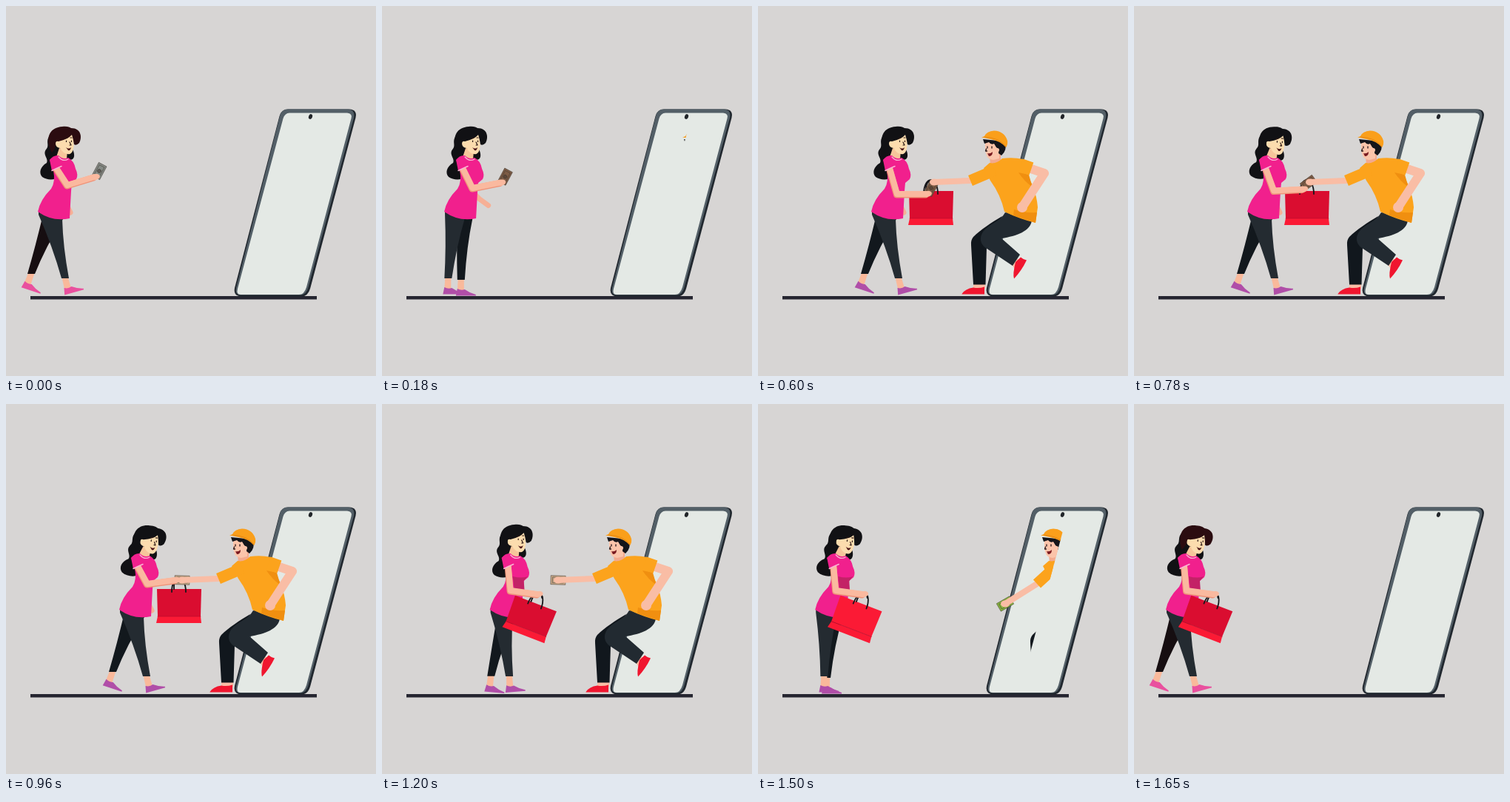
Recreate the animation shown at these times as an HTML page. Size 500 px wide and 500 px high, loop 1.83 s.

```html
<!DOCTYPE html>
<html lang="en">
<head>
<meta charset="utf-8">
<title>Doorstep delivery</title>
<style>
  html, body { margin: 0; width: 100%; height: 100%; overflow: hidden; background: #d7d5d4; }
  svg { display: block; width: 100%; height: 100%; }
  .line { fill: none; stroke-linecap: round; stroke-linejoin: round; }
</style>
</head>
<body>
<svg viewBox="0 0 500 500">
  <defs>
    <!-- The courier steps out of a slanted slit in the middle of the screen. -->
    <clipPath id="slit"><path d="M0,0H458L324,500H0Z"/></clipPath>
    <g id="foot">
      <path d="M-4,-2H4V15H-5Z" fill="#f9b99b"/>
      <path d="M-5,12Q0,15 5,13Q12,18 20,20V21.500H-7Z" fill="currentColor"/>
    </g>
  </defs>

  <path d="M33,392H420V396.500H33Z" fill="#252530"/>

  <g id="phone">
    <path d="M381,139.500H464Q475,140 472.500,151L411,382Q408,392 400,392.500H318Q307,392 309,381L369.500,149Q372,139.500 381,139.500Z" fill="#20272e"/>
    <path d="M381,139.500H462Q472,140 470,151L408.500,380Q406,390 398,390.500H318Q309,391 311,381L370,149Q372,139.500 381,139.500Z" fill="#535f67"/>
    <path d="M383,144.500H461Q468.500,145 466.500,152L406,380Q403,390 396,390H317Q311,390 313,382L374.500,152Q377,144.500 383,144.500Z" fill="#e4e9e5"/>
    <ellipse cx="411.500" cy="149.500" rx="2.500" ry="3.500" transform="rotate(18 411.500 149.500)" fill="#22262a"/>
  </g>

  <g clip-path="url(#slit)"><g class="man">
    <path d="M291,375H307V382H291Z" fill="#f9bda5"/>
    <path d="M275.500,389Q280,382 291,380.500Q299,382 306,379.500V389.500H275.500Z" fill="#f0162f"/>
    <path d="M330,284C316,292 300,303 291,312Q287.500,316 288,323L291,376.500H307.500L309,326Z" fill="#11171d"/>
    <path d="M343,350L350,341L355,345L347,355Z" fill="#f9bda5"/>
    <path d="M348,346L355,339.500Q359,343 363,343.500Q356,358 346,368.500Q344,362 348,346Z" fill="#f0162f"/>
    <path d="M334,279L370,290C368,304 350,311 329,314L354,336L344,351L308,327C298,320 299,308 309,300C317,293 328,290 334,279Z" fill="#222a31"/>
    <path d="M313,203L328,198V209L324,217L314,215Z" fill="#f3aa8e"/>
    <path d="M313,212Q322,214 330,206Q345,204 358,207L367,212L365,231L371,242Q377,258 378,272L375,293Q354,288 333,278Q328,255 314,236L305,219Z" fill="#fca31c"/>
    <path d="M352,225Q359,236 371,245L366,228ZM346,275Q360,280 377,279L375,293L345,283Z" fill="#f08f10"/>
    <path id="manBackArm" class="line" stroke="#f9bda5" stroke-width="12"/>
    <circle id="manBackHand" r="7" fill="#f9bda5"/>
    <path id="manBackSleeve" stroke="#fca31c" stroke-width="18"/>
    <path d="M307,185L318,183L322,190L326,191V206L318,208Q310,207 309,202L307,196Z" fill="#fbc4aa"/>
    <path d="M304,180L334,183Q337,195 329,202L325,199Q326,193 322,191L319,186Q315,188 312,184L306,186Z" fill="#15151a"/>
    <circle cx="323.500" cy="194.500" r="2.500" fill="#fbc4aa"/>
    <path d="M310,199Q314,200 317,197Q317,203 312,203Z" fill="#7a1a20"/>
    <path d="M310,190v2M316,190v2M308.500,193l-1,3h2" class="line" stroke="#241519" stroke-width="1.300"/>
    <path d="M302,177.500L306,176Q309,169 319,168.500Q333,169 337,182Q338,187 335,191Q327,182 314,180Q307,178 302,177.500Z" fill="#fa9f1b"/>
    <path d="M306,177Q326,178 335,190" class="line" stroke="#e58512" stroke-width="1"/>
  </g></g>

  <g class="woman">
    <path id="backArm" class="line" stroke="#f6b096" stroke-width="7"/>
    <use id="farFoot" href="#foot"/>
    <path id="farLeg"/>
    <use id="nearFoot" href="#foot"/>
    <path id="nearLeg" fill="#242b31"/>
    <g id="head">
      <path d="M60,174C52,183 60,188 54,194C49,201 58,206 55,212C46,217 44,226 49,231C56,236 67,235 72,231C77,225 77,219 74,211L82,206C91,211 94,204 91,196L82,180Z" fill="#111114"/>
      <path d="M72,192L83,195L82,207L73,209L68,204Z" fill="#f6c69b"/>
      <path d="M70,180L90,174Q93,190 90,196Q88,201 83,200Q77,199 73,192Q67,191 67,186Q67,181 70,180Z" fill="#fcdcae"/>
      <path id="hair" d="M59,191C54,176 60,164 76,163C83,162 86,164 88,165C102,165 103,178 99,185Q95,189 92,187Q91,180 89,174Q84,180 71,183Q66,182 67,188Q66,194 62,198Q60,195 59,191Z"/>
      <path d="M80,179l3,-1M87,178l2,0M81.500,182v1.500M88.500,182v1.500M86,184l2,4h-2" class="line" stroke="#2a1714" stroke-width="1.200"/>
      <path d="M81,191Q85,194 88,191Q87,196 84,195Z" fill="#4b1418"/>
    </g>
    <path d="M59,208Q64,201 71,202Q77,208 84,205Q92,209 94,220Q98,228 95,234L89,239L88,250L86,287Q63,292 43,278Q46,262 61,247Q67,238 64,222Z" fill="#f1208d"/>
    <path id="shade" d="M74,233Q86,236 94,233L89,239L90,254L77,257Z" fill="#c32266"/>
    <path d="M71,204Q77,211 84,207" class="line" stroke="#f9b6d4" stroke-width="1.200"/>
  </g>

  <g clip-path="url(#slit)">
    <g id="bag">
      <path id="bagBody" d="M-30,-23H30L29,14H-29Z"/>
      <path d="M-29,14H29L30,23H-31Z" fill="#fb1a35"/>
      <path d="M-29,14H29" class="line" stroke="#b90c2b" stroke-width=".7"/>
      <path d="M-10,-19C-10,-44 9,-44 9,-19M-7,-23C-8,-38 2,-40 5,-33" class="line" stroke="#17161a" stroke-width="1.800"/>
    </g>
    <g id="note" stroke="#3b332c" stroke-opacity=".6" stroke-width=".8">
      <rect id="paper" x="-10" y="-6" width="20" height="12"/>
      <rect x="-7.500" y="-3.800" width="15" height="7.600" fill="none"/>
      <circle r="2.500" fill="#3b332c" fill-opacity=".5"/>
    </g>
    <g class="man">
      <path id="manArm" class="line" stroke="#f9bda5" stroke-width="8"/>
      <ellipse id="manHand" rx="6" ry="4.500" fill="#f9bda5"/>
      <path id="manSleeve" stroke="#fca31c" stroke-width="15"/>
    </g>
  </g>

  <g class="woman">
    <path id="armEdge" class="line" stroke="#ef9479" stroke-width="9" transform="translate(-.5 1)"/>
    <path id="arm" class="line" stroke="#fab99f" stroke-width="8"/>
    <ellipse id="hand" rx="6" ry="4" fill="#fab99f"/>
    <path d="M59,208Q65,202 70,206L75,217Q69,219 62,223Z" fill="#f1208d"/>
    <path d="M62,222.500Q69,219 75,216.500" class="line" stroke="#f9b6d4" stroke-width="1.500"/>
  </g>
</svg>

<script>
const LOOP = 1830, STEP = 30, LAST = 1650, WALK_TIME = 540;
const $ = id => document.getElementById(id);
const set = (id, name, value) => $(id).setAttribute(name, value);
const shift = (actor, x) => document.querySelectorAll(actor).forEach(el =>
  el.setAttribute("transform", `translate(${x} 0)`));
const place = (id, x, y, turn = 0) => set(id, "transform", `translate(${x} ${y}) rotate(${turn})`);
const ramp = (t, from, to) => Math.max(0, Math.min(1, (t - from) / (to - from)));
const blend = (a, b, k) => a.map((v, i) => v + (b[i] - v) * k);

// Arm poses: elbow x, y, hand x, y.
const WOMAN_ARM = {
  carry: [83, 242, 119, 231], offer: [78, 254, 117, 254],
  grip: [81, 243, 118, 238], bag: [71, 252, 107, 257]
};
const MAN_ARM = {
  low: [309, 248, 298, 292], offer: [287, 236, 238, 238], leave: [297, 243, 254, 270]
};
const MAN_BACK_ARM = {
  low: [378, 250, 308, 260], offer: [387, 226, 357, 272], leave: [378, 238, 331, 270]
};

function leg(id, hipL, hipR, ankle, y, bend) {
  const knee = (hipL + hipR) / 4 + ankle / 2 + bend;
  set(id, "d", `M${hipL},276V282Q${knee - 7},325 ${ankle - 5},${y}H${ankle + 5}` +
    `Q${knee + 7},325 ${hipR},288V276Z`);
}

function drawLegs(walked) {
  const stride = .92 * Math.cos(2 * Math.PI * walked) + .08;
  const lift = Math.max(0, stride) ** 2;
  const near = 57 + 23 * stride, far = 57 - 23 * stride, farY = 370 - 8 * lift;
  leg("nearLeg", 44, 72 + 4 * stride, near, 368, 0);
  leg("farLeg", 58 - 8 * stride, 80 - 3 * stride, far, farY, -2);
  place("nearFoot", near, 368, -16 * lift);
  place("farFoot", far, farY, 18 * lift);
}

function drawWoman([ex, ey, hx, hy], walked, nod, carriesBag) {
  drawLegs(walked);
  set("head", "transform", `rotate(${nod} 72 214)`);
  const armPath = `M68,219L${ex},${ey}L${hx},${hy}`;
  set("arm", "d", armPath);
  set("armEdge", "d", armPath);
  place("hand", hx + 2, hy, -15);

  const swing = Math.sin(Math.PI * walked);
  const bx = 87 + 18 * swing, by = 279 - 11 * swing;
  set("backArm", "d", `M78,248L${(78 + bx) / 2},${by - 9}L${bx},${by}`);
  set("backArm", "visibility", carriesBag ? "hidden" : "visible");
  set("shade", "visibility", carriesBag ? "visible" : "hidden");
}

function drawMan([ex, ey, hx, hy], [bx, by, cx, cy]) {
  set("manArm", "d", `M${ex},${ey}L${hx},${hy}`);
  set("manSleeve", "d", `M320,222L${ex},${ey}`);
  place("manHand", hx, hy);
  const [sx, sy] = blend([355, 215], [bx, by], .45);
  set("manBackArm", "d", `M366,219L${bx},${by}L${cx},${cy}`);
  set("manBackSleeve", "d", `M355,215L${sx},${sy}`);
  place("manBackHand", cx, cy);
}

function drawColours(t, alone) {
  const vivid = t >= 1260 && !alone;
  set("hair", "fill", alone ? "#2b0c10" : "#111114");
  for (const id of ["nearFoot", "farFoot"]) set(id, "color", alone ? "#e9509e" : "#b04ea8");
  set("farLeg", "fill", alone ? "#160e11" : "#12181d");
  set("bagBody", "fill", vivid ? "#fb1a35" : "#da0d30");
  set("paper", "fill", alone ? "#858a85" : vivid ? "#86b33f" : t < 800 ? "#7c5b45" : "#c2a585");
}

function draw(time) {
  const t = Math.min(LAST, Math.floor(time % LOOP / STEP) * STEP);

  // The way back mirrors the way in.
  const walked = ramp(Math.min(t, LAST - t), 0, WALK_TIME);
  const womanX = 110 * Math.min(1, 1.12 * walked);
  const manX = 156 * (1 - ramp(t, 0, WALK_TIME)) + .002 * Math.max(0, t - 1300) ** 2;
  shift(".woman", womanX);
  shift(".man", manX);

  const reach = ramp(t, 360, 540), trade = ramp(t, 660, 960);
  const take = ramp(t, 1080, 1200), leave = ramp(t, 1300, 1380);
  const manPose = ({ low, offer, leave: away }) => blend(blend(low, offer, reach), away, leave);

  const { carry, offer, grip, bag } = WOMAN_ARM;
  const womanArm = blend(blend(blend(carry, offer, walked), grip, trade), bag, take);
  const arm = t < 1080 ? womanArm : blend(grip, bag, take);
  const manArm = manPose(MAN_ARM);
  const glanceUp = Math.max(0, 1 - Math.abs(t - 1200) / 150);
  drawWoman(arm, walked, 9 * trade * (1 - glanceUp), take > .6);
  drawMan(manArm, manPose(MAN_BACK_ARM));

  const offeredBag = blend([332 + manX, 310, -73], [234, 273, 0], reach);
  place("bag", ...blend(offeredBag, [womanX + 97, 291, 21], take));
  const paid = [womanX + arm[2] + 7, arm[3] - 8, -62];
  place("note", ...blend(paid, [manArm[2] + manX, manArm[3], 2 - 32 * leave], trade));
  drawColours(t, manX > 110);
}

const start = performance.now();
(function tick() {
  draw(performance.now() - start);
  requestAnimationFrame(tick);
})();
</script>
</body>
</html>
```
